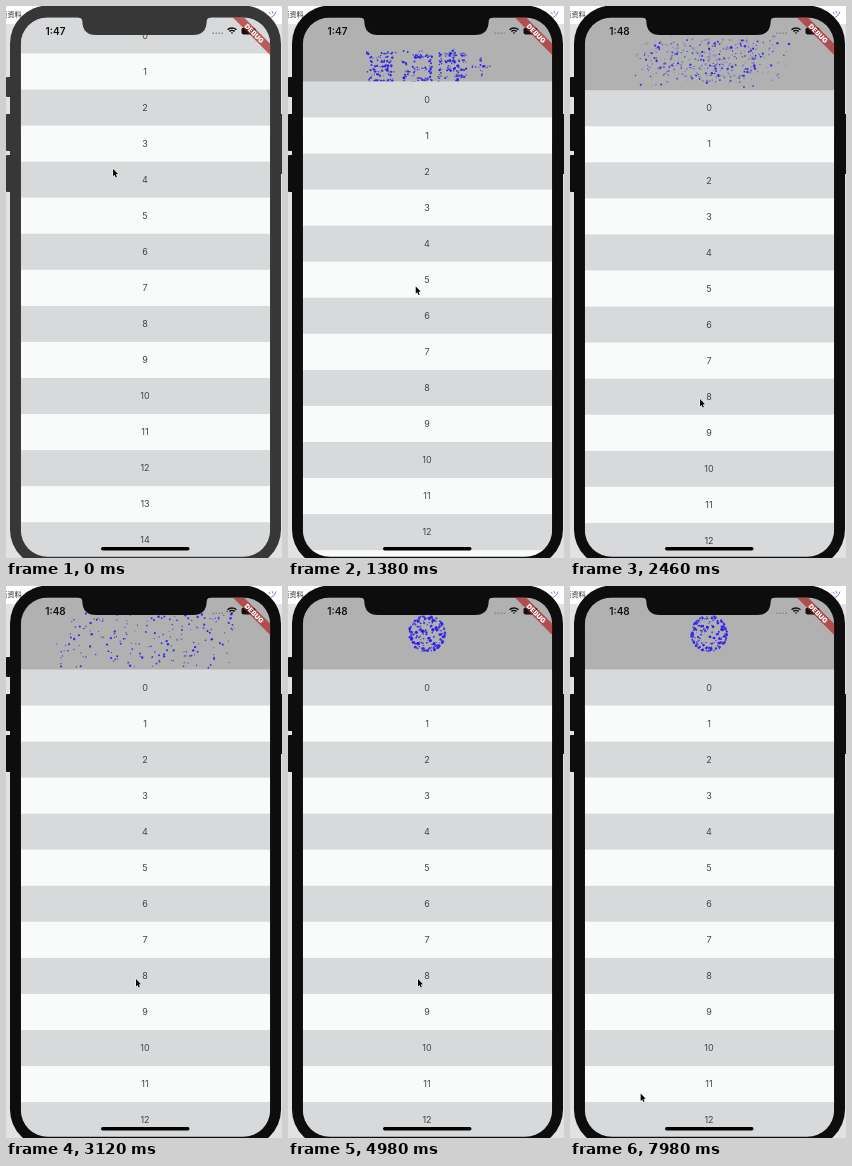
An HTML page with a canvas for the animation above (8000 ms loop, 276x552 px).

```html
<!DOCTYPE html>
<html lang="zh">
<head>
<meta charset="utf-8">
<title>Pull to refresh</title>
<style>
  html, body { margin: 0; width: 100%; height: 100%; overflow: hidden; background: #fff; }
  canvas { display: block; width: 276px; height: 552px; }
</style>
</head>
<body>
<canvas></canvas>
<script>
const W = 276, H = 552, LOOP = 8000;
const SCREEN = { x: 14.8, y: 11.4, w: 249.4, h: 539.4, r: 27 };
const ROW = 36.06;
const FOCUS = 380, RELEASE = 2150;
const SANS = 'Inter, Roboto, sans-serif';
const CJK = '"Noto Sans CJK SC", "Noto Sans CJK", sans-serif';

const canvas = document.querySelector('canvas');
const dpr = window.devicePixelRatio || 1;
canvas.width = W * dpr;
canvas.height = H * dpr;
const ctx = canvas.getContext('2d');

// Keyframe rows are [time, ...values].
const cursorKeys = [
  [0, 107, 163], [400, 125, 113], [1020, 126, 196], [1850, 130, 390], [2000, 130, 393],
  [5100, 130, 393], [5650, 108, 481], [5940, 104, 482], [6200, 102, 479],
  [7620, 102, 479], [8000, 69, 509]
];
const pullKeys = [[0, 0], [400, 0], [1020, 38.6], [1850, 97], [2000, 98.6]];

const mix = (a, b, k) => a + (b - a) * k;
const clamp = k => Math.min(1, Math.max(0, k));
const span = (t, from, to) => clamp((t - from) / (to - from));
const smooth = k => k * k * (3 - 2 * k);
const easeOut = k => 1 - (1 - k) ** 3;

function track(keys, t) {
  const i = keys.findIndex(key => key[0] > t);
  if (i < 0) return keys[keys.length - 1].slice(1);
  const a = keys[i - 1], b = keys[i];
  return a.slice(1).map((v, j) => mix(v, b[j + 1], span(t, a[0], b[0])));
}

let seed = 20;
function random() {
  seed = (seed * 1664525 + 1013904223) % 4294967296;
  return seed / 4294967296;
}

// Random points inside the lettering become particles.
function makeParticles(count) {
  const mask = document.createElement('canvas');
  mask.width = W;
  mask.height = 100;
  const m = mask.getContext('2d');
  m.font = `36px ${CJK}`;
  m.textBaseline = 'alphabetic';
  m.fillText('喜泊库+', 75, 74);
  const data = m.getImageData(0, 0, W, 100).data;
  const list = [];
  for (let tries = 0; list.length < count && tries < 90000; tries++) {
    const x = 70 + random() * 140, y = 38 + random() * 42;
    if (data[((y | 0) * W + (x | 0)) * 4 + 3] < 110) continue;
    const i = list.length;
    list.push({
      x, y,
      size: 0.5 + 0.75 * random() ** 1.4,
      farX: 52 + random() * 176,
      farY: 25 + random() * 56,
      phase: random() * 6.28,
      height: random() * 2 - 1,
      angle: random() * 6.28,
      gray: random() < 0.12,
      stays: i < 200
    });
  }
  return list;
}
const particles = makeParticles(430);

function roundRect(x, y, w, h, r, color) {
  ctx.beginPath();
  ctx.roundRect(x, y, w, h, r);
  ctx.fillStyle = color;
  ctx.fill();
}

function label(text, x, y, font, color, align = 'center') {
  ctx.font = font;
  ctx.fillStyle = color;
  ctx.textAlign = align;
  ctx.textBaseline = 'alphabetic';
  ctx.fillText(text, x, y);
}

function drawDesktop() {
  ctx.fillStyle = '#fff';
  ctx.fillRect(0, 0, W, H);
  ctx.fillStyle = '#e2e2e2';
  ctx.fillRect(0, 18, W, H);
  label('页资料', 15.5, 11, `7px ${CJK}`, '#222', 'right');
  ctx.strokeStyle = '#6b5fd0';
  ctx.lineWidth = 0.8;
  ctx.beginPath();
  ctx.moveTo(263, 6); ctx.lineTo(264.5, 8);
  ctx.moveTo(266, 5); ctx.lineTo(267, 7.5);
  ctx.moveTo(270, 5.5); ctx.quadraticCurveTo(269, 10, 265, 11.5);
  ctx.stroke();
}

function drawBody(color) {
  roundRect(4, -0.5, 271, 562, 38, color);
  [[0, 71, 20], [0, 108, 37], [0, 149, 37], [273, 108, 60]].forEach(
    ([x, y, h]) => roundRect(x, y, 6, h, 1, color));
}

function drawParticles(t) {
  const burst = easeOut(span(t, RELEASE, 3050));
  const spin = t * 0.0012;
  const swell = mix(1.12, 1, smooth(span(t, 4980, 5700)));
  for (const p of particles) {
    if (!p.stays && burst > 0.97) continue;
    const drift = burst * 3;
    let x = mix(p.x, p.farX, burst) + drift * Math.sin(t / 600 + p.phase);
    let y = mix(p.y, p.farY, burst) + drift * Math.cos(t / 700 + p.phase);
    const gather = smooth(span(t, 3400 + p.phase * 60, 4500 + p.phase * 60));
    const ring = Math.sqrt(1 - p.height ** 2);
    const depth = Math.cos(p.angle + spin) * ring;
    x = mix(x, 139 + 18 * Math.sin(p.angle + spin) * ring, gather);
    y = mix(y, 47.5 + 18 * p.height, gather);
    const size = p.size * mix(1, swell * (1.05 + 0.2 * depth), gather);
    ctx.globalAlpha = p.stays ? mix(0.9, 0.82 + 0.18 * depth, gather) : 0.9 * (1 - burst);
    ctx.fillStyle = p.gray && gather < 0.5 ? '#75739c' : '#2a1cf0';
    ctx.beginPath();
    ctx.arc(x, y, size, 0, 7);
    ctx.fill();
  }
  ctx.globalAlpha = 1;
}

// The rows are painted over the header, so they cut off its lower part.
function drawHeader(t) {
  ctx.fillStyle = '#b1b1b1';
  ctx.fillRect(SCREEN.x, SCREEN.y, SCREEN.w, 120);
  drawParticles(t);
}

function drawRows(top) {
  for (let i = 0; top + i * ROW < H; i++) {
    const y = top + i * ROW;
    ctx.fillStyle = i % 2 ? '#f9fbfa' : '#d8d9db';
    ctx.fillRect(SCREEN.x, y, SCREEN.w, ROW + 1);
    label(i, 139, y + 21.2, `9px ${SANS}`, '#444');
  }
}

function drawStatus(t) {
  label(t < 1500 ? '1:47' : '1:48', 49.5, 28.6, `600 10px ${SANS}`, '#111');
  ctx.fillStyle = '#888';
  for (let i = 0; i < 4; i++) ctx.fillRect(206.5 + i * 3, 26.5, 1.5, 1.5);
  ctx.strokeStyle = '#111';
  ctx.lineWidth = 1.5;
  [1, 3.6, 6.1].forEach(r => {
    ctx.beginPath();
    ctx.arc(226, 28, r, -Math.PI * 0.76, -Math.PI * 0.24);
    ctx.stroke();
  });
  roundRect(235.5, 21.8, 14, 6.6, 1.8, '#111');
}

function drawBanner() {
  ctx.save();
  ctx.translate(SCREEN.x + SCREEN.w, SCREEN.y);
  ctx.rotate(Math.PI / 4);
  ctx.fillStyle = 'rgba(176,30,30,.68)';
  ctx.fillRect(-27, 18.6, 54, 8);
  label('DEBUG', 0, 25.1, `900 6.8px ${SANS}`, '#fff');
  ctx.restore();
}

function drawNotch(color) {
  ctx.fillStyle = color;
  ctx.beginPath();
  ctx.moveTo(72, 10);
  ctx.lineTo(72, 11.4);
  ctx.quadraticCurveTo(76, 11.4, 76.3, 15);
  ctx.quadraticCurveTo(76.5, 29, 90, 29);
  ctx.lineTo(187, 29);
  ctx.quadraticCurveTo(200.5, 29, 200.7, 15);
  ctx.quadraticCurveTo(201, 11.4, 205, 11.4);
  ctx.lineTo(205, 10);
  ctx.fill();
}

function drawCursor(x, y) {
  const shape = [[0, 0], [0, 7.4], [1.6, 5.9], [2.7, 8.5], [3.9, 8], [2.8, 5.4], [5, 5.2]];
  ctx.beginPath();
  shape.forEach(([dx, dy]) => ctx.lineTo(x + dx, y + dy));
  ctx.closePath();
  ctx.strokeStyle = '#fff';
  ctx.lineWidth = 1;
  ctx.stroke();
  ctx.fillStyle = '#000';
  ctx.fill();
}

function draw(t) {
  const bodyColor = t < FOCUS ? '#373737' : '#0d0d0d';
  const pull = mix(track(pullKeys, t)[0], 72, easeOut(span(t, RELEASE, 2600)));
  ctx.setTransform(dpr, 0, 0, dpr, 0, 0);
  drawDesktop();
  drawBody(bodyColor);

  ctx.save();
  ctx.beginPath();
  ctx.roundRect(SCREEN.x, SCREEN.y, SCREEN.w, SCREEN.h, SCREEN.r);
  ctx.clip();
  drawHeader(t);
  drawRows(SCREEN.y + pull);
  drawStatus(t);
  drawBanner();
  ctx.restore();

  drawNotch(bodyColor);
  roundRect(95, 541, 88.5, 3.4, 1.7, '#000');
  drawCursor(...track(cursorKeys, t));
}

function frame() {
  draw(performance.now() % LOOP);
  requestAnimationFrame(frame);
}
frame();
</script>
</body>
</html>
```
